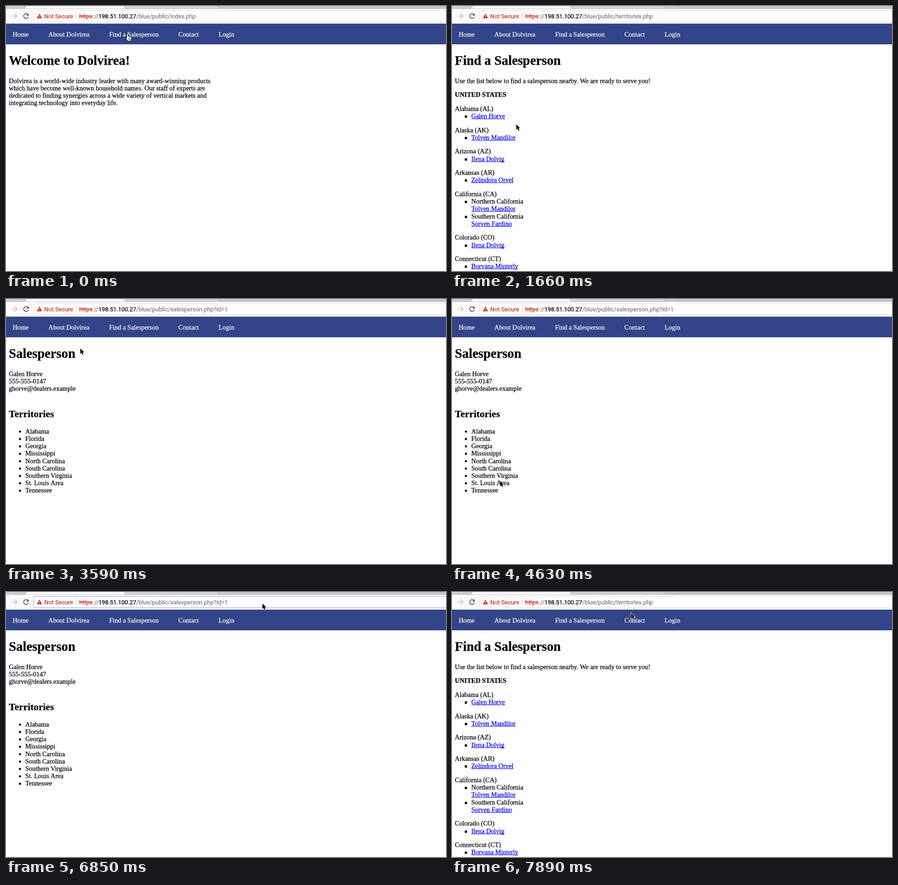
Animation of 964 by 581 pixels, one loop 8000 ms. Source, as an HTML page with a canvas:

```html
<!DOCTYPE html>
<html lang="en">
<head>
<meta charset="utf-8">
<title>Find a Salesperson</title>
<style>
html, body { margin: 0; width: 100%; height: 100%; overflow: hidden; background: #fefefe; }
canvas { display: block; }
</style>
</head>
<body>
<canvas id="stage" width="964" height="581"></canvas>
<script>
const ctx = document.getElementById('stage').getContext('2d');
const W = 964;
const H = 581;
const LOOP = 8000;
const STEP = 145;

// The page is a 16px layout shown at 90%.
const EM = 14.4;
const LINE = EM * 1.125;
const LEFT = 6.3;
const INDENT = LEFT + EM * 2.5;
const TOP = 168.5;
const serif = (size = 1, weight = 'normal') => `${weight} ${EM * size}px "Liberation Serif", serif`;
const BODY = serif();
const SANS = '12.9px Roboto, sans-serif';

const PAPER = '#fefefe';
const TOOLBAR = '#fafafa';
const RED = '#c93529';
const ICON = '#5a5a5a';
const GRAY = '#7b7b7b';
const LINK = '#0000ee';
const HOST = '198.51.100.27';

const nav = ['Home', 'About Dolvirea', 'Find a Salesperson', 'Contact', 'Login'];

const intro = [
  'Dolvirea is a world-wide industry leader with many award-winning products',
  'which have become well-known household names. Our staff of experts are',
  'dedicated to finding synergies across a wide variety of vertical markets and',
  'integrating technology into everyday life.'
];

// Each state lists its people; an area name may follow a person.
const states = [
  ['Alabama (AL)', ['Galen Horve']],
  ['Alaska (AK)', ['Tolven Mandilor']],
  ['Arizona (AZ)', ['Ilena Dolvig']],
  ['Arkansas (AR)', ['Zelindora Orvel']],
  ['California (CA)', ['Tolven Mandilor', 'Northern California'], ['Sorven Fardino', 'Southern California']],
  ['Colorado (CO)', ['Ilena Dolvig']],
  ['Connecticut (CT)', ['Borvana Minterly']]
];

const contact = ['Galen Horve', '555-555-0147', 'ghorve@dealers.example'];
const territories = ['Alabama', 'Florida', 'Georgia', 'Mississippi', 'North Carolina',
  'South Carolina', 'Southern Virginia', 'St. Louis Area', 'Tennessee'];

const views = [
  { from: 0, page: home, path: 'index.php' },
  { from: 780, page: list, path: 'territories.php' },
  { from: 2244, page: person, path: 'salesperson.php?id=1' },
  { from: 7000, page: person, path: 'salesperson.php?id=10' },
  { from: 7440, page: list, path: 'territories.php' }
];

// Pointer moves: first step, number of steps, destination, shape on arrival
const moves = [
  { from: 0, steps: 1, x: 266, y: 61, shape: hand },
  { from: 925, steps: 4, x: 140, y: 258, shape: arrow },
  { from: 1806, steps: 2, x: 95, y: 242, shape: hand },
  { from: 2990, steps: 3, x: 392, y: 82, shape: arrow },
  { from: 3290, steps: 3, x: 162, y: 107, shape: arrow },
  { from: 3890, steps: 2, x: 74, y: 215, shape: arrow },
  { from: 4190, steps: 4, x: 104, y: 397, shape: arrow },
  { from: 4920, steps: 2, x: 432, y: 9, shape: arrow },
  { from: 5370, steps: 3, x: 516, y: 25, shape: arrow },
  { from: 6700, steps: 2, x: 561, y: 24, shape: arrow },
  { from: 7000, steps: 1, x: 561.5, y: 26, shape: beam },
  { from: 7890, steps: 1, x: 391.5, y: 45, shape: arrow }
];

const between = (t, from, to) => t >= from && t < to;
const latest = (rows, t) => rows.findLastIndex(row => row.from <= t);
const easeOut = p => p * (2 - p);
const mix = (a, b, p) => a + (b - a) * p;

function text(str, x, y, font = BODY, color = '#000') {
  ctx.font = font;
  ctx.fillStyle = ctx.strokeStyle = color;
  ctx.lineWidth = 0.25;
  ctx.fillText(str, x, y);
  ctx.strokeText(str, x, y);
  return ctx.measureText(str).width;
}

function rect(x, y, w, h, color) {
  ctx.fillStyle = color;
  ctx.fillRect(x, y, w, h);
}

function paint(fill, stroke, width = 1) {
  ctx.lineWidth = width;
  if (stroke) { ctx.strokeStyle = stroke; ctx.stroke(); }
  if (fill) { ctx.fillStyle = fill; ctx.fill(); }
}

function polygon(points, ...style) {
  ctx.beginPath();
  points.forEach(([x, y]) => ctx.lineTo(x, y));
  ctx.closePath();
  paint(...style);
}

function arc(x, y, r, from, to, ...style) {
  ctx.beginPath();
  ctx.arc(x, y, r, from, to);
  paint(...style);
}

function strokes(color, width, ...paths) {
  ctx.beginPath();
  for (const path of paths) path.forEach(([x, y], i) => i ? ctx.lineTo(x, y) : ctx.moveTo(x, y));
  paint(null, color, width);
}

function heading(str) {
  text(str, LEFT, 129, serif(2, 'bold'));
}

function lines(rows, x, y) {
  rows.forEach((row, i) => text(row, x, y + i * LINE));
}

function home() {
  heading('Welcome to Dolvirea!');
  lines(intro, LEFT, TOP);
}

function list() {
  heading('Find a Salesperson');
  text('Use the list below to find a salesperson nearby. We are ready to serve you!', LEFT, TOP);
  let y = TOP + LINE + EM;
  text('UNITED STATES', LEFT, y, serif(1, 'bold'));
  for (const [state, ...people] of states) {
    y += LINE + EM;
    text(state, LEFT, y);
    for (const [name, area] of people) {
      y += LINE;
      rect(28, Math.round(y) - 6, 5, 5, '#000');
      if (area) {
        text(area, INDENT, y);
        y += LINE;
      }
      const width = text(name, INDENT, y, BODY, LINK);
      rect(INDENT, Math.round(y) + 1, width, 1, LINK);
    }
  }
}

function person() {
  const top = 294.8;
  heading('Salesperson');
  lines(contact, LEFT, TOP);
  text('Territories', LEFT, 259, serif(1.5, 'bold'));
  lines(territories, INDENT, top);
  territories.forEach((_, i) => arc(30.5, top - 4 + i * LINE, 2.4, 0, 7, '#000'));
}

function tab(left, right, color) {
  polygon([[left + 3, 0], [right - 3, 0], [right, 5.5], [left, 5.5]], color, '#a8a8a8');
}

function tabs() {
  rect(0, 0, W, 6, '#c6c6c6');
  tab(-9, 45, '#d0d0d0');
  tab(255, 466, '#d5d5d5');
  ctx.beginPath();
  ctx.roundRect(468, -4, 24, 6, 2);
  paint('#d5d5d5', '#adadad');
  rect(0, 5, W, 1, '#aeaeae');
  tab(42, 261, TOOLBAR);
  rect(0, 6, W, 32, TOOLBAR);
  rect(0, 38, W, 1, '#bdbdbd');
}

function cross(x, y, r) {
  strokes(ICON, 1.9, [[x - r, y - r], [x + r, y + r]], [[x + r, y - r], [x - r, y + r]]);
}

function buttons(loading) {
  strokes('#c3c3c3', 1.7, [[12, 22], [24, 22]], [[18.5, 16.3], [24.3, 22], [18.5, 27.7]]);
  if (loading) return cross(44, 22, 5);
  arc(44, 22, 5.2, 0.35, 5.5, null, ICON, 1.8);
  polygon([[50, 15.8], [50, 21.2], [44.6, 21.2]], ICON);
}

function infoBadge() {
  arc(73, 22, 5.4, 0, 7, null, ICON, 1.2);
  rect(72.3, 18.8, 1.4, 1.5, ICON);
  rect(72.3, 21.2, 1.4, 4, ICON);
}

function warningBadge() {
  polygon([[73.2, 16.3], [79, 27], [67.4, 27]], RED);
  rect(72.6, 19.8, 1.2, 3.5, '#fff');
  rect(72.6, 24.3, 1.2, 1.2, '#fff');
}

function address(path, plain, focused, caret) {
  const y = 26.6;
  const inset = focused ? 1 : 0.5;
  ctx.beginPath();
  ctx.roundRect(60 + inset, 9 + inset, W, 26 - inset * 2, 2.5);
  paint(PAPER, focused ? '#7db0e8' : '#c4c4c4', inset * 2);

  const hostX = plain ? 126.5 : 202.5;
  if (plain) {
    infoBadge();
    text('https://', 84.5, y, SANS, GRAY);
  } else {
    warningBadge();
    text('Not Secure', 83.7, y, SANS, RED);
    rect(154, 14, 1, 16, '#cfcfcf');
    const width = text('https', 160.3, y, SANS, RED);
    rect(160, 22, width, 1, RED);
    text('://', 190.3, y, SANS, GRAY);
  }
  const pathX = hostX + text(HOST, hostX, y, SANS);
  const end = pathX + text('/blue/public/' + path, pathX, y, SANS, GRAY);
  if (caret) rect(Math.round(end), 14, 1, 16, '#000');
}

function menu() {
  rect(0, 39, W, 45, '#334488');
  let x = EM;
  for (const label of nav) x += text(label, x, 66.7, BODY, '#fff') + EM * 3;
}

function arrow() {
  ctx.lineJoin = 'miter';
  polygon([[0.8, 1.2], [0.8, 13.2], [3.6, 10.7], [5.6, 15.6], [7.7, 14.7], [5.7, 10], [9.3, 10]], '#000', '#fff', 1.6);
}

function hand() {
  ctx.beginPath();
  ctx.roundRect(-1, 0.8, 2.8, 12, 1.4);
  for (let i = 1; i < 4; i++) ctx.roundRect(-1 + i * 2.2, 5 + i * 0.6, 2.6, 7, 1.3);
  ctx.roundRect(-1, 8, 9, 7.2, 3);
  ctx.moveTo(-3.6, 8.2);
  ctx.lineTo(0, 9.5);
  ctx.lineTo(0, 13.5);
  ctx.closePath();
  paint('#fff', '#000', 2);
  for (let x = 2; x < 7; x += 2) rect(x, 10, 0.8, 3, '#000');
}

function beam() {
  const serifs = [-7, 7].map(y => [[-3, y], [-1, y], [0, y * 0.85], [1, y], [3, y]]);
  for (const [color, width] of [['#fff', 2.4], ['#000', 1.1]]) {
    strokes(color, width, ...serifs, [[0, -6], [0, 6]], [[-2, 2.5], [2, 2.5]]);
  }
}

function pointer(t) {
  const i = latest(moves, t);
  const to = moves[i];
  const start = moves[i - 1] || to;
  const p = Math.min(1, (Math.floor((t - to.from) / STEP) + 1) / to.steps);
  ctx.save();
  ctx.translate(mix(start.x, to.x, easeOut(p)), mix(start.y, to.y, easeOut(p)));
  (p < 1 ? arrow : to.shape)();
  ctx.restore();
}

function draw(t) {
  const { page, path } = views[latest(views, t)];
  const loading = between(t, 300, 780) || between(t, 2098, 2390) || between(t, 7140, 7740);
  const typing = between(t, 7000, 7140);
  rect(0, 0, W, H, PAPER);
  tabs();
  buttons(loading);
  address(path, between(t, 7000, 7440), between(t, 5370, 7140), between(t, 5520, 6100) || typing);
  menu();
  page();
  pointer(t);
}

const began = performance.now();
function tick() {
  draw((performance.now() - began) % LOOP);
  requestAnimationFrame(tick);
}
tick();
</script>
</body>
</html>
```
